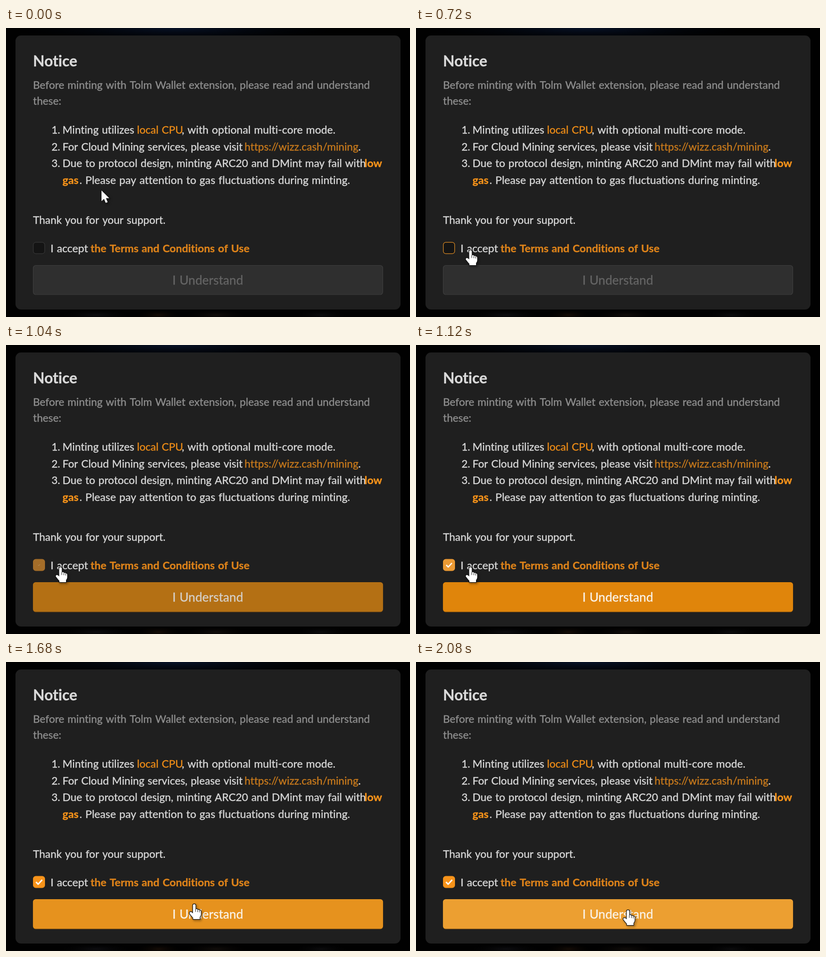
Write an HTML page with a canvas that moves like this. It is 808 px wide and 580 px high and loops after 2.48 s.

```html
<!DOCTYPE html>
<html lang="en">
<head>
<meta charset="utf-8">
<title>Notice</title>
<style>
html, body { margin: 0; width: 100%; height: 100%; overflow: hidden; background: #010101; }
canvas { display: block; }
</style>
</head>
<body>
<canvas id="stage" width="808" height="580"></canvas>
<script>
const ctx = document.getElementById('stage').getContext('2d');
const LOOP = 2480, STEP = 80, LAST = 2080;
const FAMILY = 'Lato, "Open Sans", sans-serif';
const WHITE = '#dadada', GREY = '#8f8f8f', ORANGE = '#f7931a';
const BODY = 21.3, WIDE = 21.7;

// Pointer path: time, x, y
const PATH = [
  [0, 191, 326], [160, 182, 342], [400, 130, 416], [560, 111, 443],
  [720, 109, 446], [1120, 109, 446], [1280, 140, 450], [1440, 237, 465],
  [1600, 345, 479], [1760, 408, 493], [1920, 421, 497], [2080, 424, 498]
];

const ramp = (t, a, b) => Math.min(1, Math.max(0, (t - a) / (b - a)));
const mix = (a, b, p) => `rgb(${a.map((v, i) => Math.round(v + (b[i] - v) * p))})`;

function pointerAt(t) {
  let i = 0;
  while (i < PATH.length - 2 && t >= PATH[i + 1][0]) i++;
  const [ta, xa, ya] = PATH[i], [tb, xb, yb] = PATH[i + 1];
  const p = ramp(t, ta, tb);
  return [xa + (xb - xa) * p, ya + (yb - ya) * p];
}

// A hairline stroke gives the text a medium weight
function say(text, x, y, color = WHITE, size = BODY, weight = 400, align = 'left') {
  ctx.font = `${weight} ${size}px ${FAMILY}`;
  ctx.letterSpacing = '0.01px'; // turns ligatures off
  ctx.wordSpacing = '1px';
  ctx.fillStyle = ctx.strokeStyle = color;
  ctx.lineWidth = 0.35;
  ctx.lineJoin = 'round';
  ctx.textAlign = align;
  ctx.fillText(text, x, y);
  ctx.strokeText(text, x, y);
}

function box(x, y, w, h, r, fill, stroke) {
  ctx.beginPath();
  ctx.roundRect(x, y, w, h, r);
  ctx.fillStyle = fill;
  ctx.fill();
  if (stroke) {
    ctx.strokeStyle = stroke;
    ctx.lineWidth = 1.2;
    ctx.stroke();
  }
}

function glow(x, y, rx, ry, color) {
  ctx.save();
  ctx.translate(x, y);
  ctx.scale(rx, ry);
  const g = ctx.createRadialGradient(0, 0, 0, 0, 0, 1);
  g.addColorStop(0, color);
  g.addColorStop(1, 'rgba(0,0,0,0)');
  ctx.fillStyle = g;
  ctx.fillRect(-1, -1, 2, 2);
  ctx.restore();
}

function backdrop() {
  ctx.fillStyle = '#010101';
  ctx.fillRect(0, 0, 808, 580);
  glow(340, 0, 360, 32, 'rgba(8,20,44,0.9)');
  glow(180, 576, 80, 12, 'rgba(18,18,22,0.7)');
  glow(305, 576, 50, 12, 'rgba(30,17,8,0.7)');
  glow(420, 576, 70, 12, 'rgba(24,18,14,0.7)');
  glow(630, 576, 60, 12, 'rgba(16,16,18,0.7)');
  box(19, 15, 770, 550, 11, '#1f1f1f');
}

function copy() {
  say('Notice', 54, 76.5, WHITE, 30, 700);
  say('Before minting with Tolm Wallet extension, please read and understand', 54, 121.5, GREY);
  say('these:', 54, 154, GREY);

  say('1.', 91, 211.5);
  say('Minting utilizes', 113, 211.5);
  say('local CPU', 262, 211.5, '#ed8c17');
  say(', with optional multi-core mode.', 351.5, 211.5, WHITE, WIDE);

  say('2.', 91, 245.5);
  say('For Cloud Mining services, please visit', 113, 245.5);
  say('https://wizz.cash/mining', 477, 245.5, '#c87a1c');
  say('.', 704.5, 245.5);

  say('3.', 91, 278.5);
  say('Due to protocol design, minting ARC20 and DMint may fail with', 113, 278.5);
  say('low', 717, 278.5, ORANGE, WIDE, 700);
  say('gas', 113, 312.5, ORANGE, WIDE, 700);
  say('. Please pay attention to gas fluctuations during minting.', 147, 312.5, WHITE, WIDE);

  say('Thank you for your support.', 54, 392.5);
  say('I accept', 89, 449.5, WHITE, WIDE);
  say('the Terms and Conditions of Use', 169, 449.5, '#de831a', WIDE, 700);
}

function checkbox(t) {
  const hover = ramp(t, 480, 640), on = ramp(t, 940, 1090), vivid = ramp(t, 1120, 1360);
  const fill = vivid ? mix([236, 154, 52], [247, 147, 26], vivid)
                     : mix([20, 20, 20], [236, 154, 52], on);
  const edge = on ? fill : mix([54, 54, 54], [216, 136, 36], hover);
  box(54.6, 430.1, 22.8, 22.8, 5, fill, edge);
  const size = ramp(t, 1000, 1130);
  if (!size) return;
  ctx.save();
  ctx.translate(66, 441.5);
  ctx.scale(size, size);
  ctx.globalAlpha = size;
  ctx.beginPath();
  ctx.moveTo(-6, 0);
  ctx.lineTo(-1.7, 4.4);
  ctx.lineTo(6.3, -4.2);
  ctx.strokeStyle = '#fff';
  ctx.lineWidth = 2.8;
  ctx.stroke();
  ctx.restore();
}

function button(t) {
  const on = ramp(t, 950, 1070), hover = ramp(t, 1600, 1760);
  const fill = hover ? mix([224, 133, 11], [236, 159, 49], hover)
                     : mix([47, 47, 47], [224, 133, 11], on);
  if (on) box(54, 477.5, 700, 59, 5, `rgba(110,66,10,${on * 0.7})`);
  box(54.5, 476.5, 699, 58.5, 5, fill, on ? fill : '#3d3d3d');
  say('I Understand', 403.5, 514.5, mix([100, 100, 100], [250, 243, 232], on), 24.8, 400, 'center');
}

function paint(path, line) {
  ctx.save();
  ctx.shadowColor = 'rgba(0,0,0,0.5)';
  ctx.shadowBlur = 4;
  ctx.shadowOffsetX = ctx.shadowOffsetY = 2;
  ctx.lineJoin = 'round';
  ctx.strokeStyle = '#151515';
  ctx.lineWidth = line;
  ctx.stroke(path);
  ctx.restore();
  ctx.fillStyle = '#fff';
  ctx.fill(path);
}

const arrow = new Path2D('M0 0V21.5L5 17L8.5 25L12.3 23.4L8.9 15.5H15.5Z');
const hand = new Path2D('M-2.6 2.5Q-2.6 0 0 0Q2.6 0 2.6 2.5V10.5Q4 8.8 6.6 10.6L7 11.8' +
  'Q9.3 10.3 10.6 12.6Q13.4 12.2 13.4 15V20.5Q13.2 23.5 11 26V30H-2.2V27.2' +
  'Q-5 24.5 -9.2 18.8Q-10 16 -7.3 15.4Q-5.2 15.4 -2.6 18.6Z');
const folds = new Path2D('M2.6 10V15.5M6.8 11.5V16M10.5 12.5V16.5');

function pointer(t) {
  const [x, y] = pointerAt(t);
  ctx.save();
  ctx.translate(x, y);
  if (y < 430) {
    paint(arrow, 2);
  } else {
    paint(hand, 2.4);
    ctx.strokeStyle = '#333';
    ctx.lineWidth = 1.1;
    ctx.stroke(folds);
  }
  ctx.restore();
}

function draw(now) {
  const t = Math.min(LAST, Math.floor((now % LOOP) / STEP) * STEP);
  backdrop();
  copy();
  checkbox(t);
  button(t);
  pointer(t);
}

const start = performance.now();
function tick() {
  draw(performance.now() - start);
  requestAnimationFrame(tick);
}
tick();
</script>
</body>
</html>
```
